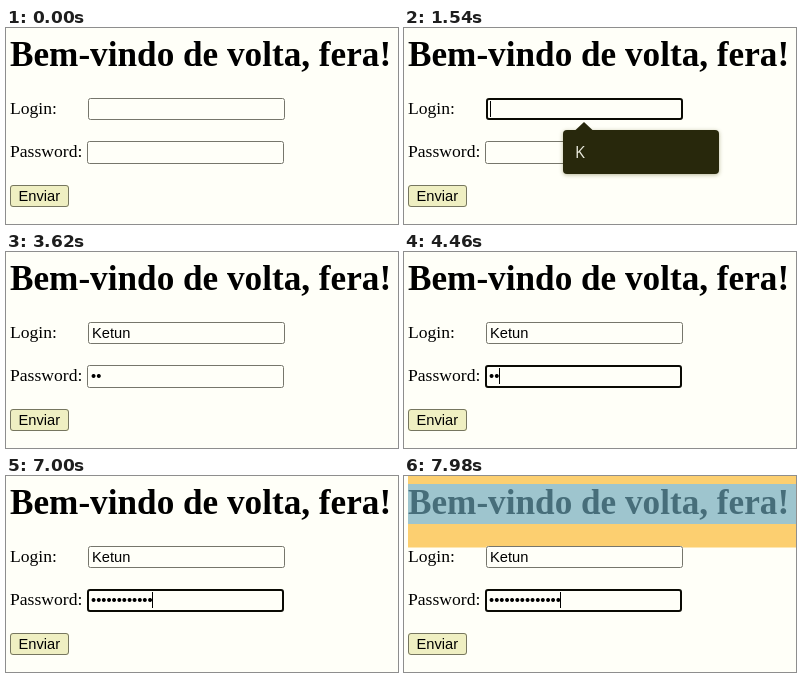
An HTML page with a canvas that plays this animation: 392x196 px, repeating every 8 s.

```html
<!DOCTYPE html>
<html lang="pt">
<head>
<meta charset="utf-8">
<title>Login</title>
<style>
  html, body { margin: 0; width: 100%; height: 100%; overflow: hidden; background: #fffff8; }
  canvas { display: block; width: 392px; height: 196px; }
</style>
</head>
<body>
<canvas id="stage" width="392" height="196"></canvas>
<script>
const LOOP = 8000;
const ctx = document.getElementById('stage').getContext('2d');
const PAPER = '#fffff8';
const CONTENT = 'rgba(108,168,186,0.66)';
const SERIF = '"Liberation Serif", "Times New Roman", serif';
const SANS = '"Liberation Sans", Arial, sans-serif';
const UI = '"Open Sans", "Noto Sans", sans-serif';
const FIELD_FONT = '14.667px ' + SANS;
const USER = 'Ketun';

// Times at which each login letter appears
const userKeys = [1960, 2240, 2380, 2520, 2640];
// [time, number of password characters]
const passKeys = [
  [0, 0], [3220, 1], [3360, 2], [4780, 1], [5000, 0], [5200, 1], [5340, 2],
  [5600, 3], [5740, 4], [5880, 5], [6000, 6], [6140, 7], [6280, 8], [6420, 9],
  [6560, 10], [6720, 11], [6880, 12], [7040, 13], [7300, 14]
];

const within = (t, from, to) => t >= from && t < to;

function text(str, x, y, font, color = '#000') {
  ctx.font = font;
  ctx.fillStyle = color;
  ctx.fillText(str, x, y);
}

function box(x, y, w, h, r, fill) {
  ctx.beginPath();
  ctx.roundRect(x, y, w, h, r);
  ctx.fillStyle = fill;
  ctx.fill();
}

// Border drawn inside the given box
function border(x, y, w, h, r, color, width) {
  ctx.beginPath();
  ctx.roundRect(x + width / 2, y + width / 2, w - width, h - width, r);
  ctx.strokeStyle = color;
  ctx.lineWidth = width;
  ctx.stroke();
}

function triangle(x, y, half, height, fill) {
  ctx.beginPath();
  ctx.moveTo(x - half, y);
  ctx.lineTo(x + half, y);
  ctx.lineTo(x, y + height);
  ctx.fillStyle = fill;
  ctx.fill();
}

function shadow(blur, alpha) {
  ctx.shadowColor = `rgba(80,80,20,${alpha})`;
  ctx.shadowBlur = blur;
  ctx.shadowOffsetY = blur ? 1 : 0;
}

function field(x, y, h, value, base, focused, caret) {
  box(x, y, 197, h, 2, PAPER);
  if (focused) border(x, y, 197, h, 2, '#0a0a04', 2);
  else border(x, y, 197, h, 2, '#76766c', 1);
  text(value, x + 4, base, FIELD_FONT);
  if (focused && caret) {
    const end = Math.floor(x + 4 + ctx.measureText(value).width);
    ctx.fillStyle = '#000';
    ctx.fillRect(end, base - 13, 1, 16);
  }
}

function suggestion() {
  shadow(4, 0.4);
  box(159, 102, 156, 44, 4, '#28280c');
  shadow(0, 0);
  triangle(180, 102.5, 9, -8.5, '#28280c');
  text(USER[0], 171, 130, '16px ' + UI, '#ecece0');
}

function labelHighlight() {
  ctx.fillStyle = CONTENT;
  ctx.fillRect(4, 114, 72, 19);
  shadow(6, 0.4);
  box(4, 80, 135, 26, 3, '#fffffa');
  shadow(0, 0);
  triangle(22, 105.5, 8.5, 9, '#fffffa');
  text('label', 13, 98, 'bold 13px ' + UI, '#80186f');
  text('65.77\u200a×\u200a18.18', 54, 98, '12.8px ' + UI, '#6e6e60');
}

function titleHighlight() {
  ctx.fillStyle = '#fccf70';
  ctx.fillRect(4, 0, 388, 8);
  ctx.fillRect(4, 48, 388, 23.5);
  ctx.fillStyle = CONTENT;
  ctx.fillRect(4, 8, 388, 40);
}

function draw(t) {
  ctx.fillStyle = PAPER;
  ctx.fillRect(0, 0, 392, 196);

  text('Bem-vindo de volta, fera!', 4, 38, 'bold 35.2px ' + SERIF);
  text('Login:', 4, 86, '17.6px ' + SERIF);
  text('Password:', 4, 129, '17.6px ' + SERIF);
  if (t >= 7920) titleHighlight();

  const typed = USER.slice(0, userKeys.filter(k => t >= k).length);
  const dots = passKeys.filter(k => t >= k[0]).pop()[1];
  const onLogin = within(t, 540, 2800);
  const onPass = within(t, 2800, 3600) || t >= 4200;

  field(82, 70, 22, typed, 86, onLogin, !within(t, 1120, 1500));
  field(81, 113, 23, '•'.repeat(dots), 129, onPass, !within(t, 7600, 7960));

  box(4, 157, 59, 22, 2.5, '#efefc2');
  border(4, 157, 59, 22, 2.5, '#767660', 1);
  text('Enviar', 12.5, 173, FIELD_FONT);

  if (within(t, 1420, 2000)) suggestion();
  if (within(t, 7580, 7860)) labelHighlight();
}

function tick() {
  draw(performance.now() % LOOP);
  requestAnimationFrame(tick);
}
tick();
</script>
</body>
</html>
```
